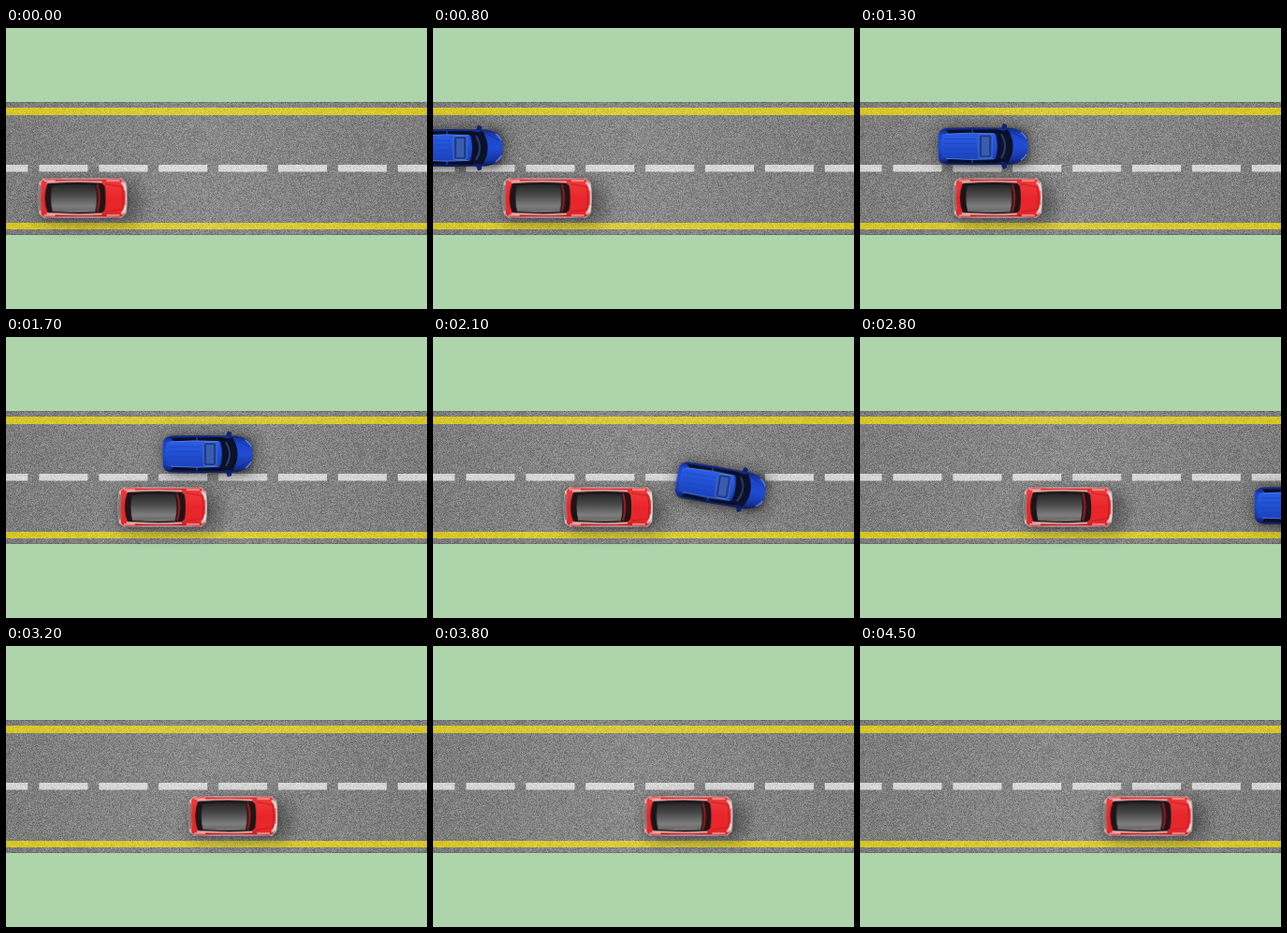
These frames come from a looping animation (450 px wide and 300 px high, 4600 ms). An HTML page with a canvas:

```html
<!DOCTYPE html>
<html lang="en">
<head>
<meta charset="utf-8">
<title>Overtaking</title>
<style>
html, body { margin: 0; width: 100%; height: 100%; overflow: hidden; background: #aed4ac; }
canvas, svg { position: absolute; left: 0; top: 0; width: 450px; height: 300px; }
#red { animation: cruise 4600ms steps(46) infinite; }
@keyframes cruise {
  from { transform: translate(81.5px, 181.5px); }
  to { transform: translate(312.5px, 181.5px); }
}
</style>
</head>
<body>
<canvas id="road" width="450" height="300"></canvas>
<svg viewBox="0 0 450 300">
  <defs>
    <filter id="soft" x="-40%" y="-80%" width="180%" height="260%"><feGaussianBlur stdDeviation="9"/></filter>
    <filter id="tight" x="-20%" y="-40%" width="140%" height="180%"><feGaussianBlur stdDeviation="2.5"/></filter>
    <linearGradient id="redBody" x2="0" y2="1">
      <stop offset="0" stop-color="#d8242a"/><stop offset=".12" stop-color="#f0383a"/>
      <stop offset=".5" stop-color="#e8262a"/><stop offset=".88" stop-color="#e8282c"/>
      <stop offset="1" stop-color="#b8141c"/>
    </linearGradient>
    <linearGradient id="roof" x2="0" y2="1">
      <stop offset="0" stop-color="#262626"/><stop offset=".4" stop-color="#4a4a4a"/>
      <stop offset=".8" stop-color="#7e7e7e"/><stop offset="1" stop-color="#686868"/>
    </linearGradient>
    <linearGradient id="blueBody" x2="0" y2="1">
      <stop offset="0" stop-color="#0f2478"/><stop offset=".2" stop-color="#1c46c8"/>
      <stop offset=".5" stop-color="#1f4cd4"/><stop offset=".8" stop-color="#1838a8"/>
      <stop offset="1" stop-color="#0b1850"/>
    </linearGradient>
    <linearGradient id="blueRoof" x2="0" y2="1">
      <stop offset="0" stop-color="#2a5ee6"/><stop offset="1" stop-color="#1a42bc"/>
    </linearGradient>
  </defs>

  <g id="red">
    <rect x="-46" y="-17" width="108" height="44" rx="14" opacity=".36" filter="url(#soft)"/>
    <rect x="-47" y="-20" width="95" height="42" rx="7" opacity=".18" filter="url(#tight)"/>
    <path d="M-46-17Q-49 0-46 17L-41 21H42L47 16Q49 0 47-16L42-21H-41Z" fill="#d3c4c2"/>
    <path d="M-44-17Q-42-20.5-37-20.5L-20-20H20L38-20.5Q43-20.5 45-16Q47 0 45 16Q43 20.5 38 20.5L20 20H-20L-37 20.5Q-42 20.5-44 17Q-46 0-44-17Z" fill="url(#redBody)"/>
    <path d="M-46-14Q-48.5 0-46 14L-43 12Q-45 0-43-12Z" fill="#8c7674"/>
    <path d="M-37-16Q-8-18 20-16.5L24-13Q26 0 24 13L20 16.5Q-8 18-37 16Q-43 0-37-16Z" fill="#1c1516"/>
    <path d="M-38-16.5Q-8-18.5 21-17M-38 16.5Q-8 18.5 21 17" fill="none" stroke="#f0d8d6" stroke-width="1.3"/>
    <path d="M-32-13Q-8-15 14-13.5Q17 0 14 13.5Q-8 15-32 13Q-35 0-32-13Z" fill="url(#roof)"/>
    <path d="M-32 13.7Q-8 15.5 14 14" fill="none" stroke="#bdb4b3" stroke-width=".8"/>
    <path d="M15-14Q19 0 15 14L17 15Q22 0 17-15Z" fill="#8e1a20"/>
    <path d="M25-15 43-12Q45 0 43 12L25 15" fill="none" stroke="#c41a20"/>
    <path d="M26-18.5H40M26 18.5H40M-41-18.5H-29M-41 18.5H-29" stroke="#f7b4b0" stroke-width="1.6"/>
    <path d="M42-17Q46-13 46-8M42 17Q46 13 46 8" fill="none" stroke="#f2e6e3" stroke-width="2"/>
  </g>

  <g id="blue">
    <rect x="-50" y="-22" width="102" height="46" rx="14" opacity=".36" filter="url(#soft)"/>
    <rect x="-47" y="-19" width="95" height="40" rx="10" opacity=".3" filter="url(#tight)"/>
    <path d="M19-19 21-24.5 25-23 25-18ZM19 19 21 24.5 25 23 25 18Z" fill="#10226c"/>
    <path d="M-48-13Q-47-18.5-39-19.5L-10-20 30-19.5Q42-17.5 46-10Q49 0 46 10Q42 17.5 30 19.5L-10 20-39 19.5Q-47 18.5-48 13Q-49 0-48-13Z" fill="url(#blueBody)"/>
    <path d="M-40-17.5 14-18 24-16 14-13.5H-37ZM-40 17.5 14 18 24 16 14 13.5H-37Z" fill="#080e26"/>
    <path d="M-12-18V-14M-12 18V14" stroke="#1c3c9c" stroke-width="1.5"/>
    <path d="M-44-13Q-15-15 12-13.5Q15 0 12 13.5Q-15 15-44 13Q-46 0-44-13Z" fill="url(#blueRoof)"/>
    <path d="M-42-8H-8M-42-3H-8M-42 3H-8M-42 8H-8" stroke="#1a44ba" stroke-width=".8"/>
    <path d="M-40-13Q-15-15 11-13.5M-40 13Q-15 15 11 13.5" fill="none" stroke="#5a82e2" stroke-width=".8"/>
    <rect x="-5" y="-12.5" width="14" height="25" rx="2" fill="#1c3c90" stroke="#5c80d0" stroke-width=".8"/>
    <rect x="-2" y="-10" width="8" height="20" rx="1" fill="#3a5cae"/>
    <path d="M13-14 26-18Q37 0 26 18L13 14Q17 0 13-14Z" fill="#0a1128"/>
    <path d="M19-13Q27 0 19 13" fill="none" stroke="#2a3a66" stroke-width="2"/>
    <path d="M32-14 44-8M32 14 44 8" stroke="#15309a"/>
    <path d="M40-15Q45-11 46-8M40 15Q45 11 46 8" fill="none" stroke="#6384cc" stroke-width="1.2"/>
  </g>
</svg>
<script>
const ctx = document.getElementById('road').getContext('2d');
const blue = document.getElementById('blue');

function fill(color, x, y, w, h) {
  ctx.fillStyle = color;
  ctx.fillRect(x, y, w, h);
}

function drawRoad() {
  fill('#aed4ac', 0, 0, 450, 300);
  fill('#7c7c7c', 0, 79, 450, 142);
  fill('#6c6c6a', 0, 79, 450, 1);
  fill('#6c6c6a', 0, 220, 450, 1);
  fill('#d6c628', 0, 85, 450, 8);
  fill('#d6c628', 0, 208, 450, 7);
  for (let i = 0; i < 8; i++) fill('#d4d4d4', -28.5 + i * 63.9, 146, 52, 7.5);

  // Slightly brighter towards the middle
  const light = ctx.createLinearGradient(0, 0, 450, 0);
  light.addColorStop(0, '#fff0');
  light.addColorStop(.48, '#ffffff1a');
  light.addColorStop(1, '#fff0');
  fill(light, 0, 79, 450, 142);

  // Seeded asphalt grain, weaker on the paint
  let seed = 7;
  const random = () => (seed = seed * 16807 % 2147483647) / 2147483647;
  const area = ctx.getImageData(0, 79, 450, 142);
  const px = area.data;
  for (let i = 0; i < px.length; i += 4) {
    const grain = (random() + random() - 1) * (px[i] > 180 ? 18 : 32);
    for (let c = 0; c < 3; c++) px[i + c] += grain;
  }
  ctx.putImageData(area, 0, 79);
}

// Linear interpolation through [time, value] points
function along(points, t) {
  let i = 1;
  while (i < points.length - 1 && t > points[i][0]) i++;
  const [t0, a] = points[i - 1], [t1, b] = points[i];
  return a + (b - a) * (t - t0) / (t1 - t0);
}

const path = [[0, -141], [800, 27], [1700, 216], [2400, 377.5], [4600, 886]];
const drift = [[0, 131], [800, 128], [1700, 125], [4600, 125]];

function drawBlue(t) {
  const p = Math.min(1, Math.max(0, (t - 1750) / 600));
  const ease = p * p * (3 - 2 * p);
  const y = along(drift, t) + 55 * ease;
  const turn = 10 * Math.sin(Math.PI * p);
  blue.setAttribute('transform', `translate(${along(path, t)} ${y}) rotate(${turn})`);
}

const cruise = document.getElementById('red').getAnimations()[0];
const start = performance.now();
cruise.startTime = document.timeline.currentTime;

function frame() {
  const t = Math.max(0, performance.now() - start) % 4600;
  drawBlue(Math.floor(t / 100) * 100);
  requestAnimationFrame(frame);
}

drawRoad();
frame();
</script>
</body>
</html>
```
